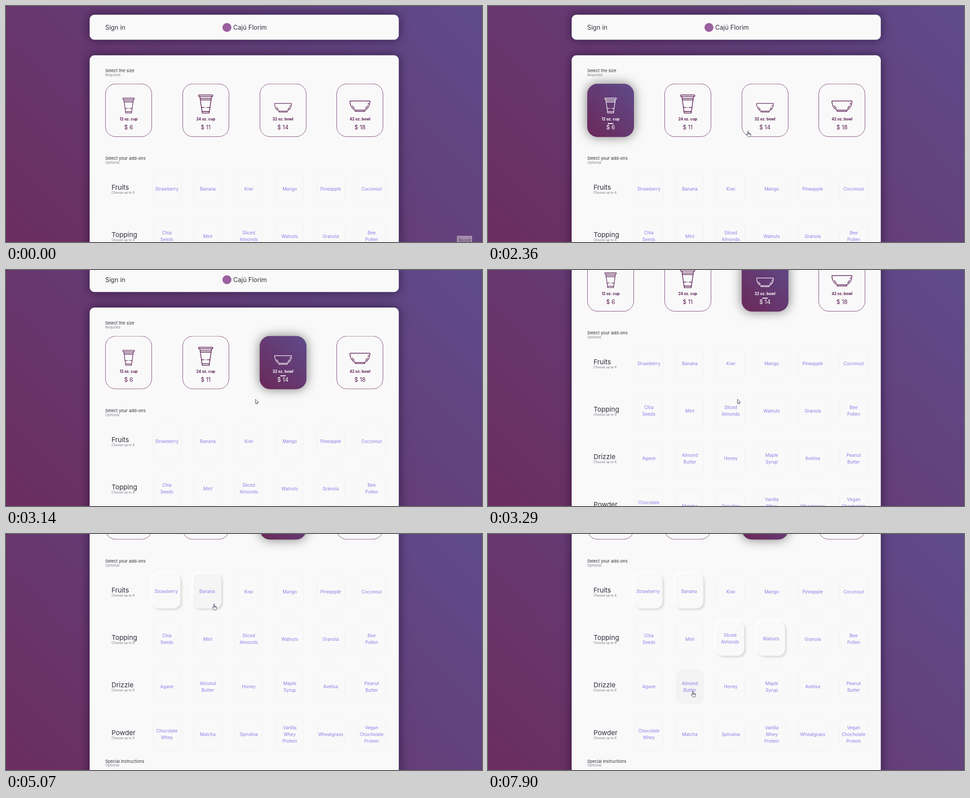
These frames come from a looping animation (1060 by 528 pixels, 8 s). An HTML page:

```html
<!DOCTYPE html>
<html lang="en">
<head>
<meta charset="utf-8">
<title>Order form</title>
<style>
  html, body { margin: 0; width: 100%; height: 100%; overflow: hidden; }
  #stage {
    position: relative; width: 1060px; height: 528px; overflow: hidden;
    background: linear-gradient(45deg, #6b2d5f, #5f4b8b);
    font: 400 9.9px Inter, sans-serif; color: #332d3c;
  }
  #stage div, #stage svg { position: absolute; box-sizing: border-box; }
  #page { left: 0; top: 0; width: 1060px; height: 1000px; animation: scroll 8s linear infinite; }
  #panels {
    left: 0; top: 0; width: 1060px; height: 1000px; overflow: visible; fill: #f9f9f9;
    filter: drop-shadow(0 0 11px rgba(20, 4, 36, .62));
  }
  .text { white-space: pre; line-height: 20px; margin-top: -10px; }
  .brand, .nav { font-size: 14px; }
  .head { font-size: 9.4px; }
  .sub { font-size: 8px; color: #8b8492; }
  .hint { font-size: 7.1px; color: #77717d; }
  .group { font-size: 14.9px; }
  #logo { left: 482px; top: 38px; width: 20px; height: 20px; border-radius: 50%; background: #9a5f9f; }

  .card { width: 104px; height: 118.5px; border-radius: 23px; color: #5c1f55; text-align: center; }
  .card svg { left: 0; top: 0; width: 104px; height: 119px; fill: none; stroke: currentColor; }
  .card .text { left: 0; width: 104px; }
  .card .edge { stroke: #773f70; stroke-width: .95; }
  .label { font-weight: 700; font-size: 8.3px; }
  .price { font-size: 12.6px; }
  .lit { color: #fff; background: linear-gradient(45deg, #6b2858, #5f4b8b); }
  .lit .edge { display: none; }
  .bar { left: 46px; top: 87px; width: 12px; height: 2px; background: #fff; }

  .tile {
    width: 62.5px; height: 77.5px; border: 1px solid #f2f2f3; border-radius: 15px;
    display: flex; align-items: center; justify-content: center;
    white-space: pre; text-align: center; line-height: 15px; color: #917de6;
  }
  #tip {
    left: 1004px; top: 514px; width: 34px; height: 20px; padding: 4px 0 0 4px;
    background: #a38cab; color: #47305a; font: 8.2px/12px "Open Sans", sans-serif;
    animation: tip 8s linear infinite;
  }
  #cursor { left: 0; top: 0; width: 12px; height: 16px; animation: move 8s linear infinite, shown 8s linear infinite; }
  #cursor svg { left: 0; top: 0; width: 12px; height: 16px; overflow: visible; fill: #fff; stroke: #38304a; stroke-linejoin: round; stroke-linecap: round; }
  #arrow { animation: arrow 8s linear infinite; }
  #hand { animation: hand 8s linear infinite; }
</style>
</head>
<body>
<div id="stage">
  <div id="page">
    <svg id="panels">
      <rect x="186.3" y="19.6" width="688.4" height="55.9" rx="11"/>
      <rect x="186.3" y="110.3" width="688.4" height="880" rx="11"/>
    </svg>
    <div id="logo"></div>
  </div>
  <div id="tip">Record</div>
  <div id="cursor">
    <svg id="arrow" viewBox="0 0 12 16"><path stroke-width=".9" d="M.5 .5V9.6L2.6 7.7 4.1 11 5.6 10.3 4.2 7.2H7Z"/></svg>
    <svg id="hand" viewBox="0 0 12 16"><path stroke-width=".9" d="M3.3 8.6V1.5Q3.4.5 4.2.5T5.1 1.5V5.2Q6.9 4.7 7 6 8.5 5.5 8.6 6.6 10 6.2 10 7.6V10.4Q10 13.6 7.6 13.8H5.2Q3.7 13.6 2.9 12L.7 8.7Q.4 7.6 1.5 7.6 2.4 7.8 3.3 9M7 6V8M8.6 6.6V8.3M5.1 5.2V7.8"/></svg>
  </div>
</div>
<script>
  const LOOP = 8000;
  const page = document.getElementById('page');

  function add(parent, cls, x, y, html = '') {
    const el = document.createElement('div');
    el.className = cls;
    el.style.left = x + 'px';
    el.style.top = y + 'px';
    el.innerHTML = html;
    parent.append(el);
    return el;
  }
  const text = (parent, cls, x, y, str) => add(parent, 'text ' + cls, x, y, str);

  // Keyframes written in milliseconds: flow() interpolates, hold() keeps each state until the next.
  const at = (ms, css) => `${ms / LOOP * 100}% {${css}}`;
  const sheet = document.createElement('style');
  function flow(name, keys) {
    const last = keys[keys.length - 1][1];
    sheet.textContent += `@keyframes ${name} {${keys.map(k => at(...k)).join('')}${at(LOOP, last)}}\n`;
  }
  function hold(name, keys, ramp = 1) {
    flow(name, keys.flatMap(([ms, css], i) =>
      i ? [[ms - ramp, keys[i - 1][1]], [ms, css]] : [[ms, css]]));
  }
  const play = (el, ...names) =>
    el.style.animation = names.map(n => `${n} ${LOOP}ms linear infinite`).join();

  text(page, 'nav', 221, 47.5, 'Sign in');
  text(page, 'brand', 506, 47.5, 'Cajú Florim');
  [['Select the size', 'Required', 145], ['Select your add-ons', 'Optional', 341], ['Special Instructions', 'Optional', 788.5]]
    .forEach(([head, sub, y]) => {
      text(page, 'head', 221, y, head);
      text(page, 'sub', 221, y + 8.5, sub);
    });

  // Size cards
  const cup = `<rect x=".8" y=".8" width="26.4" height="3" rx="1.5"/>
    <path d="M3.2 3.8 7.6 34.3H20.4L24.8 3.8M4 7.2H24M4.4 10.2H23.6M6.2 24H11.5M13.3 24H14.5M16.3 24H21.6M7.2 31.3H20.8"/>`;
  const bowl = `<path d="M1.3.8H37.7Q38.4.8 38.3 1.6C37.9 9 34.5 15.6 28.5 18H10.5C4.5 15.6 1.1 9 .7 1.6Q.6.8 1.3.8Z
    M10.5 18V20.3H28.5V18M35.5 4.2Q35.3 6 34.7 7.6M33.8 9.6Q32.5 12.4 29.7 14.8M5.1 9.4Q6.5 12.6 9.3 14.8"/>`;
  const sizes = [
    ['12 oz. cup', 6, cup, 38, 31, 1],
    ['24 oz. cup', 11, cup, 34.8, 24, 1.21],
    ['32 oz. bowl', 14, bowl, 32.5, 43, 1],
    ['42 oz. bowl', 18, bowl, 29, 37.5, 1.19]
  ];
  sizes.forEach(([label, price, art, x, y, scale], i) => {
    const make = cls => {
      const card = add(page, 'card ' + cls, 221 + i * 171.8, 174,
        `<svg viewBox="0 0 104 119"><rect class="edge" x=".5" y=".3" width="103" height="118" rx="22.5"/>
        <g stroke-width="1.25" transform="translate(${x} ${y}) scale(${scale})">${art}</g></svg>`);
      text(card, 'label', 0, 79, label);
      text(card, 'price', 0, 98, '$ ' + price);
      return card;
    };
    make('');
    if (i % 2 === 0) {
      const lit = make('lit');
      add(lit, 'bar', 46, 87.5);
      play(lit, 'lit' + i, 'glow' + i);
    }
  });
  const [off, on] = ['opacity:0', 'opacity:1'];
  const flat = 'box-shadow:0 0 0 rgba(0,0,0,0)', glow = 'box-shadow:0 0 24px rgba(0,0,0,.5)';
  hold('lit0', [[0, off], [1640, on], [2830, off]]);
  hold('glow0', [[0, flat], [1960, glow]], 170);
  hold('lit2', [[0, off], [2830, on]]);
  hold('glow2', [[0, flat], [2990, glow]], 150);

  // Add-on tiles
  const groups = {
    Fruits: ['Strawberry', 'Banana', 'Kiwi', 'Mango', 'Pineapple', 'Coconout'],
    Topping: ['Chia\nSeeds', 'Mint', 'Sliced\nAlmonds', 'Walnuts', 'Granola', 'Bee\nPollen'],
    Drizzle: ['Agave', 'Almond\nButter', 'Honey', 'Maple\nSyrup', 'Avelixa', 'Peanut\nButter'],
    Powder: ['Chocolate\nWhey', 'Matcha', 'Spirulina', 'Vanilla\nWhey\nProtein', 'Wheatgrass', 'Vegan\nChocholate\nProtein']
  };
  const rest = 'background:#f9f9f900;border-color:#f2f2f3;translate:0 0;box-shadow:0 0 0 #0000,0 0 0 #fff0';
  const hover = 'background:#f3f3f4;border-color:#f3f3f4;translate:0 0;box-shadow:0 0 0 #0000,0 0 0 #fff0';
  const raised = bg => `background:${bg};border-color:${bg};translate:-1.5px -1px;box-shadow:3px 3px 5px #0002,-3px -3px 5px #fff`;
  const up = raised('#f9f9f9'), upHover = raised('#f5f5f6');
  const states = {
    Strawberry: [[0, rest], [4250, hover], [4400, upHover], [4520, up]],
    Banana: [[0, rest], [4550, hover], [4690, upHover], [5220, up]],
    'Sliced\nAlmonds': [[0, rest], [3720, hover], [3930, rest], [5350, hover], [6080, upHover], [6230, up]],
    Walnuts: [[0, rest], [6390, hover], [6550, upHover], [6940, up]],
    Agave: [[0, rest], [7400, hover], [7800, rest]],
    'Almond\nButter': [[0, rest], [7880, hover]]
  };
  Object.entries(groups).forEach(([group, names], row) => {
    const y = row * 106.4;
    text(page, 'group', 235, 405.5 + y, group);
    text(page, 'hint', 235, 417.5 + y, 'Choose up to 4');
    names.forEach((name, col) => {
      const tile = add(page, 'tile', 327 + col * 91.2, 370.3 + y, name);
      if (!states[name]) return;
      const id = 'tile' + row + col;
      hold(id, states[name], 50);
      play(tile, id);
    });
  });

  const shift = y => `transform:translateY(${-y}px)`;
  hold('scroll', [[0, shift(0)], [3140, shift(26.3)], [3290, shift(200)], [3720, shift(280.5)]], 50);

  // Pointer path: time, x, y
  const path = [
    [0, 1016, 530], [310, 1010, 528], [460, 706, 446], [610, 486, 390], [760, 330, 306],
    [840, 253, 214], [920, 292, 275], [1790, 292, 275], [2200, 626, 288], [2360, 575, 279],
    [3080, 575, 279], [3140, 555, 289], [3290, 555, 289], [3660, 555, 289], [3720, 537, 271],
    [3870, 537, 271], [4250, 366, 150], [4400, 366, 150], [4550, 452, 150], [4690, 452, 150],
    [4910, 459, 156], [5210, 459, 156], [5350, 527, 235], [5630, 527, 235], [5680, 528, 249],
    [6130, 528, 249], [6390, 628, 250], [6870, 628, 250], [7450, 344, 330], [7740, 344, 330],
    [7900, 452, 351]
  ];
  flow('move', path.map(([ms, x, y]) => [ms, `transform:translate(${x}px,${y}px)`]));
  hold('shown', [[0, off], [310, on]]);
  hold('tip', [[0, on], [310, off]]);
  hold('arrow', [[0, on], [800, off], [3140, on], [3720, off]]);
  hold('hand', [[0, off], [800, on], [3140, off], [3720, on]]);
  document.head.append(sheet);
</script>
</body>
</html>
```
